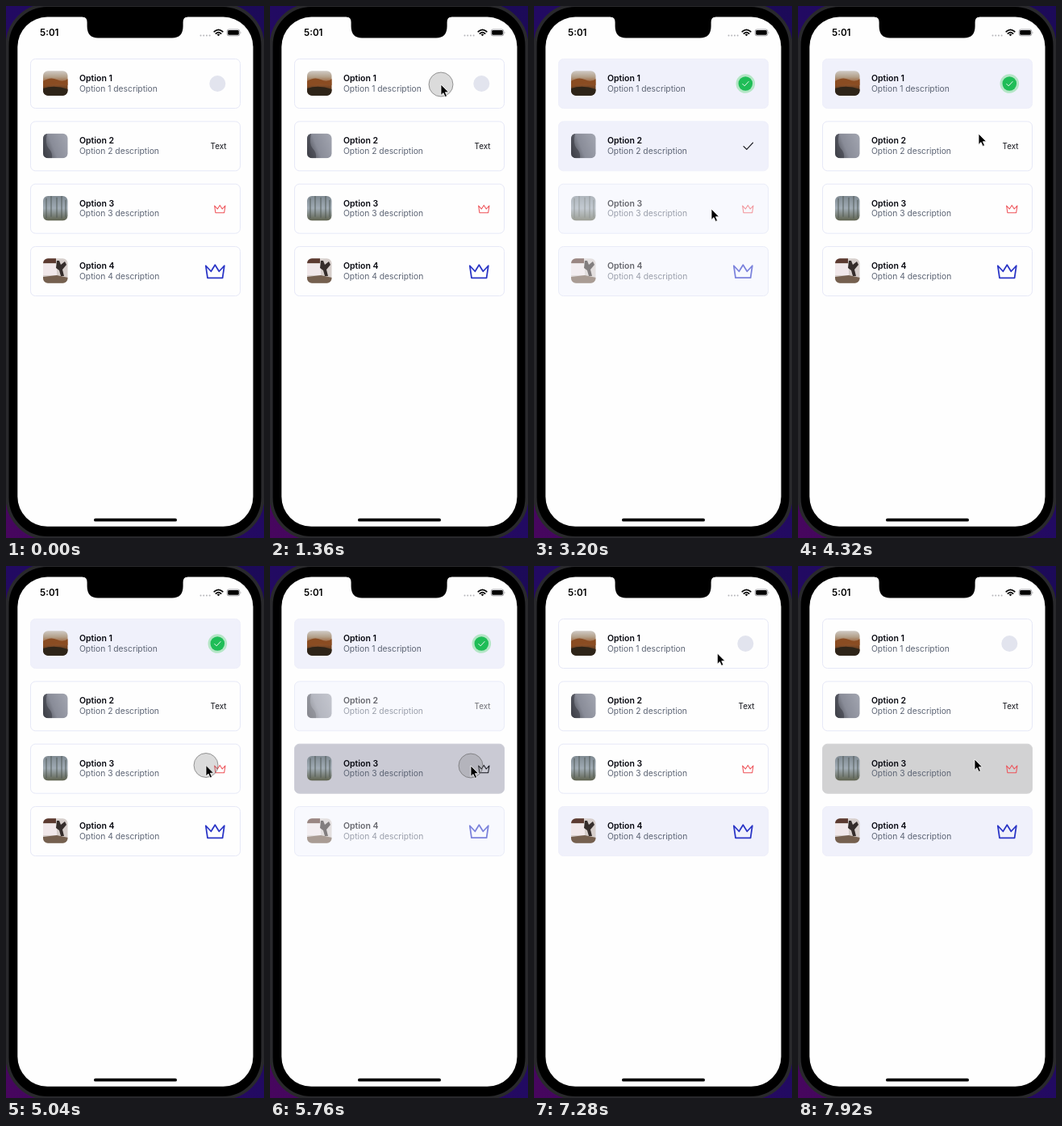
An HTML page for the animation above (8000 ms loop, 320 px wide and 658 px high).

```html
<!DOCTYPE html>
<html lang="en">
<head>
<meta charset="utf-8">
<title>Option list</title>
<style>
html, body { margin: 0; width: 100%; height: 100%; overflow: hidden; background: #000; }
svg { display: block; width: 100vw; height: 100vh; font-family: Inter, Roboto, sans-serif; }
.title { font-size: 10.5px; font-weight: 600; fill: #06070f; }
.desc { font-size: 10.3px; fill: #5c6474; }
.label { font-size: 9.9px; fill: #14151c; }
.box { fill: #fefefe; stroke: #e6e8f7; }
.on .box { fill: #f0f1fb; stroke: #eeeffa; }
.off .box { fill: #f8f9fe; stroke: #e9ecf8; }
.off .content { opacity: .6; }
.pressed .box { fill: #d2d2d3; stroke: #d4d4d6; }
.on.pressed .box { fill: #cacad4; stroke: #cccdd7; }
.line { fill: none; stroke-linecap: round; stroke-linejoin: round; }
.picked, .on .idle { display: none; }
.on .picked { display: inline; }
</style>
</head>
<body>
<svg viewBox="0 0 320 658" preserveAspectRatio="none">
  <defs>
    <linearGradient id="wall" x1="1" y1="0" x2="0" y2="1">
      <stop offset="0" stop-color="#1c0a58"/><stop offset=".5" stop-color="#220a62"/><stop offset="1" stop-color="#48065e"/>
    </linearGradient>
    <linearGradient id="mist" x1="0" y1=".7" x2="1" y2=".3">
      <stop offset="0" stop-color="#484a52"/><stop offset=".4" stop-color="#898c98"/><stop offset="1" stop-color="#a0a3ae"/>
    </linearGradient>
    <linearGradient id="field" x2="0" y2="1">
      <stop offset="0" stop-color="#d0cbc6"/><stop offset=".25" stop-color="#b3a08a"/>
      <stop offset=".5" stop-color="#96562a"/><stop offset="1" stop-color="#2c2016"/>
    </linearGradient>
    <linearGradient id="wood" x2="0" y2="1">
      <stop offset="0" stop-color="#7f8a92"/><stop offset=".5" stop-color="#a0abb4"/><stop offset="1" stop-color="#5c604c"/>
    </linearGradient>
    <clipPath id="thumb"><rect x="46" y="15.3" width="30.5" height="30.5" rx="6"/></clipPath>
    <path id="crown" d="M0 1 6.5 8 11.5 0 16.5 8 23 1 20.8 16H2.2Z"/>
  </defs>

  <rect width="320" height="658" fill="url(#wall)"/>
  <rect x="1.5" y="-1" width="317" height="659" rx="50" fill="#000" stroke="#29292c" stroke-width="4"/>
  <rect x="14.3" y="13.6" width="292.2" height="630.2" rx="37" fill="#fefefe"/>
  <path d="M95 13H225V13.6Q219.6 14 219.6 20V25Q219.6 39.5 206 39.5H114Q100.6 39.5 100.6 25V20Q100.6 14 95 13.6Z"/>

  <text x="42" y="37" font-size="11.7" font-weight="600">5:01</text>
  <g fill="#b6b6ba">
    <circle cx="241.5" cy="36.5" r="1"/><circle cx="245.2" cy="36.5" r="1"/>
    <circle cx="248.9" cy="36.5" r="1"/><circle cx="252.6" cy="36.5" r="1"/>
  </g>
  <path class="line" d="M258.3 31.7Q263.5 27 268.7 31.7M260.4 34Q263.5 31.2 266.6 34" stroke="#000" stroke-width="1.8"/>
  <path d="M261.6 35.2Q263.5 33.8 265.4 35.2L263.5 37.3Z"/>
  <rect x="274.2" y="29" width="15.6" height="7.8" rx="2.3" fill="none" stroke="#8a8a8e" stroke-width=".8"/>
  <rect x="275.2" y="30" width="13.6" height="5.8" rx="1.4"/>
  <path d="M290.8 31.5q1.4 1.4 0 2.8z" fill="#8a8a8e"/>

  <g id="rows"></g>

  <rect x="109" y="633.8" width="103" height="3.8" rx="1.9"/>
  <circle id="touch" r="15" fill="#777" fill-opacity=".26" stroke="#666" stroke-opacity=".65"/>
  <path id="cursor" d="M0 0V13.4L3 10.6 5.2 15.4 7.5 14.4 5.4 9.7H9.6Z" stroke="#fff" stroke-width=".8"/>
</svg>
<script>
const LOOP = 8000, PITCH = 77.35;
const CIRCLE_END = 115, PRESS_START = 60, PRESS_END = 240;

const photos = [
  `<rect x="46" y="15" width="31" height="31" fill="url(#field)"/>
   <path d="M46 28q9-6 17-2t14-1v8q-15-4-31 2z" fill="#8a4c22"/>
   <path d="M46 37q14-5 31 1v8H46z" fill="#2e2418"/>`,
  `<rect x="46" y="15" width="31" height="31" fill="url(#mist)"/>
   <path d="M46 15h5q-3 14 2 19t4 12H46z" fill="#3c3e46" opacity=".6"/>`,
  `<rect x="46" y="15" width="31" height="31" fill="url(#wood)"/>
   <path d="M50 18v25M56 15v26M63 17v25M69 15v28M74 20v22" stroke="#4c5350" stroke-width="1.3" opacity=".65"/>`,
  `<rect x="46" y="15" width="31" height="31" fill="#d6cecb"/>
   <path d="M46 15h16v6H46z" fill="#5c3a30"/><path d="M46 22h17v14H46z" fill="#f1e8ea"/>
   <path d="M46 38l17-2 14 3v7H46z" fill="#75604f"/>
   <path d="M63 18h3l2 5 5-4 2 4-5 6 2 8h-4l-2-7-4-3z" fill="#352d2b"/>`
];
const check = (x, y, size, color, width) =>
  `<path class="line" d="M${x} ${y}l${size * .33} ${size * .33} ${size * .67} ${-size * .72}" stroke="${color}" stroke-width="${width}"/>`;
const crown = (x, y, scale, color, state = "") =>
  `<use href="#crown" class="line ${state}" transform="translate(${x} ${y}) scale(${scale})" stroke="${color}" stroke-width="1.75"/>`;
const marks = [
  `<circle class="idle" cx="262.3" cy="31" r="10" fill="#e2e4ee"/>
   <g class="picked"><circle cx="262.3" cy="31" r="11.8" fill="#b4e6c6"/>
   <circle cx="262.3" cy="31" r="8.8" fill="#1fbd57"/>${check(258.7, 31.4, 7.4, "#e9f8ee", 1)}</g>`,
  `<text class="label idle" x="253.6" y="34.6">Text</text><g class="picked">${check(260, 31.3, 11.5, "#14151c", 1.2)}</g>`,
  crown(258.6, 26.7, .58, "#ee4f55", "idle") + crown(258.6, 26.7, .58, "#14151c", "picked"),
  crown(247.8, 23.2, 1, "#2a35c6")
];

const list = document.getElementById("rows");
list.innerHTML = photos.map((photo, i) => `<g transform="translate(0 ${65 + i * PITCH})">
  <rect class="box" x="30.5" y=".5" width="260" height="61" rx="6"/>
  <g class="content"><g clip-path="url(#thumb)">${photo}</g>
  <text class="title" x="91" y="28">Option ${i + 1}</text>
  <text class="desc" x="91" y="40.6">Option ${i + 1} description</text>${marks[i]}</g></g>`).join("");
const rows = [...list.children];
const cursor = document.getElementById("cursor"), touch = document.getElementById("touch");

// Each tap is [start time, row]; at most two rows can be chosen.
const taps = [[1360, 0], [2160, 1], [3640, 1], [5000, 2], [5680, 2], [6080, 3], [6920, 0], [7780, 2]];
const route = [
  [640, 318, 150], [1260, 212, 97], [1640, 212, 97], [2080, 206, 166], [2520, 206, 166],
  [3080, 220, 251], [3300, 220, 251], [3600, 224, 160], [4320, 224, 158],
  [4880, 247, 246], [5200, 249, 247], [5820, 249, 247], [6060, 251, 335],
  [6500, 251, 335], [6860, 228, 98], [7200, 228, 98], [7700, 219, 239], [LOOP, 219, 239]
];

function position(t) {
  const i = route.findIndex(stop => stop[0] > t);
  const [t0, x0, y0] = route[i - 1], [t1, x1, y1] = route[i];
  const p = (t - t0) / (t1 - t0), ease = p * p * (3 - 2 * p);
  return [x0 + (x1 - x0) * ease, y0 + (y1 - y0) * ease];
}

function draw(t) {
  const chosen = new Set();
  let pressed = -1, touching = false;
  for (const [start, row] of taps) {
    const age = t - start;
    if (age >= PRESS_END) chosen.has(row) ? chosen.delete(row) : chosen.add(row);
    else if (age >= PRESS_START) pressed = row;
    if (age >= 0 && age < CIRCLE_END) touching = true;
  }
  rows.forEach((row, i) => {
    const on = chosen.has(i);
    row.classList.toggle("on", on);
    row.classList.toggle("off", !on && chosen.size === 2);
    row.classList.toggle("pressed", i === pressed);
  });
  const visible = t >= route[0][0];
  cursor.style.display = visible ? "" : "none";
  touch.style.display = touching ? "" : "none";
  if (visible) {
    const place = `translate(${position(t).join(" ")})`;
    cursor.setAttribute("transform", place);
    touch.setAttribute("transform", place);
  }
}

const begin = performance.now();
function tick() {
  draw((performance.now() - begin) % LOOP);
  requestAnimationFrame(tick);
}
tick();
</script>
</body>
</html>
```
